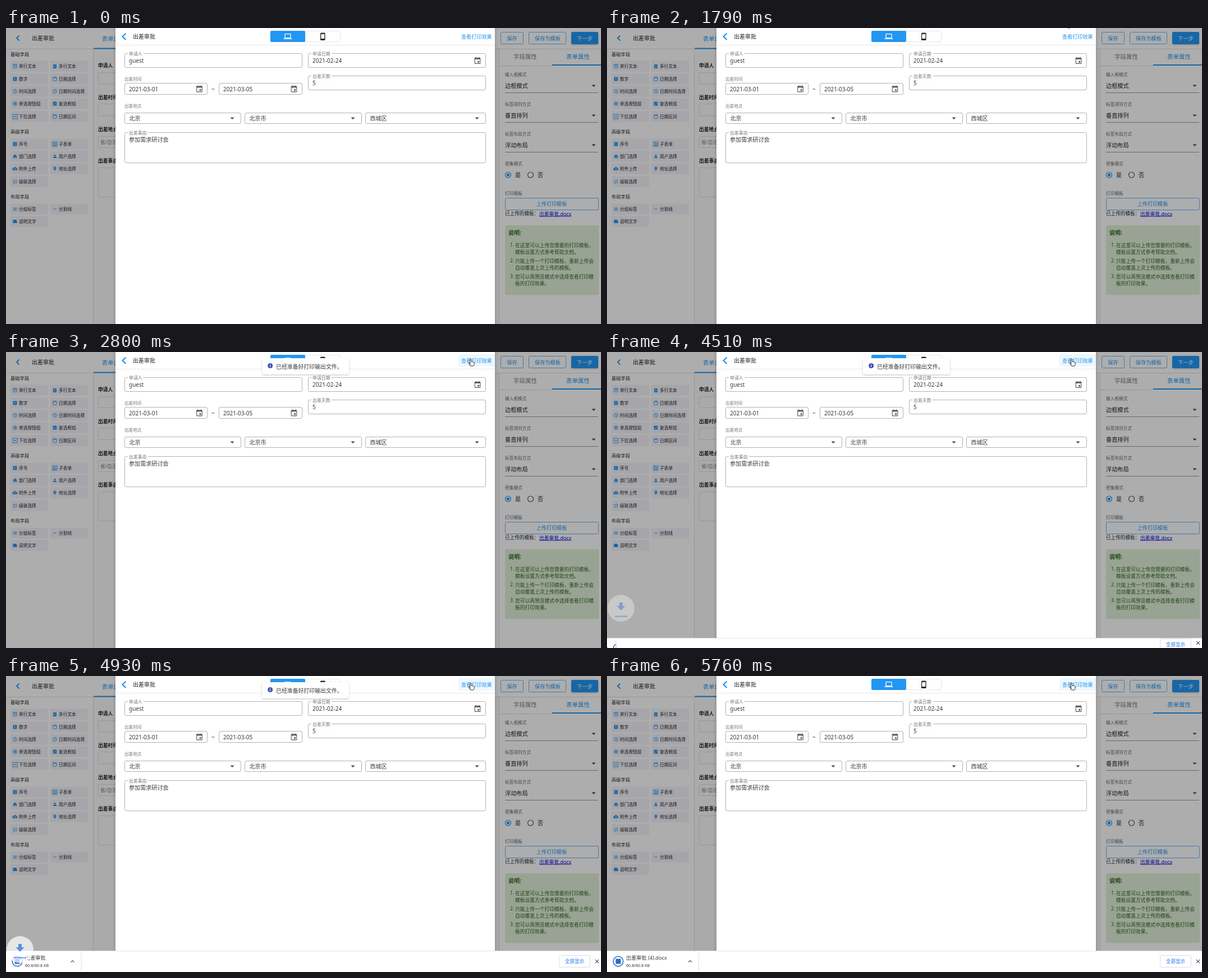
Animation, 1060 px wide and 528 px high, one loop 8 s. Source, as an HTML page:

```html
<!DOCTYPE html>
<html lang="zh-CN">
<head>
<meta charset="utf-8">
<title>表单预览</title>
<style>
html, body { margin: 0; width: 100%; height: 100%; overflow: hidden; background: #fff; }
svg { display: block; width: 1060px; height: 528px; }
text { font-family: "Noto Sans", "Noto Sans CJK SC", "Noto Sans CJK", sans-serif; white-space: pre; }
</style>
</head>
<body>
<svg id="stage" viewBox="0 0 1060 528"></svg>
<script>
const BLUE = '#2196f3', OUTLINE = '#64b5f6', FIELD = '#b2b2b2', GREEN = '#2f6420';
const LOOP = 8000;

// Shape helpers; text is placed by its vertical centre.
const rect = (x, y, w, h, fill, more = '') =>
  `<rect x="${x}" y="${y}" width="${w}" height="${h}" fill="${fill}" ${more}/>`;
const box = (x, y, w, h, stroke, r = 2, fill = 'none') =>
  rect(x + .5, y + .5, w - 1, h - 1, fill, `rx="${r}" stroke="${stroke}"`);
const text = (x, y, size, str, fill = '#3a3a3a', more = '') =>
  `<text x="${x}" y="${y + size * .4}" font-size="${size}" fill="${fill}" ${more}>${str}</text>`;
const line = (d, stroke, w = 1, more = '') =>
  `<path d="${d}" fill="none" stroke="${stroke}" stroke-width="${w}" ${more}/>`;
const shape = (d, fill) => `<path d="${d}" fill="${fill}"/>`;
const dot = (x, y, r, fill, more = '') => `<circle cx="${x}" cy="${y}" r="${r}" fill="${fill}" ${more}/>`;
const at = (x, y, body) => `<g transform="translate(${x} ${y})">${body}</g>`;
const caret = (x, y) => shape(`M${x - 3.5} ${y - 1.5}h7l-3.5 3.5z`, '#444');
const MID = 'text-anchor="middle"';
const BOLD = 'font-weight="700"';

// Small sidebar icons, centred on 0,0.
const frame = rect(-3.2, -3.2, 6.4, 6.4, 'none', `rx=".6" stroke="${BLUE}" stroke-width=".9"`);
const ring = dot(0, 0, 3.4, 'none', `stroke="${BLUE}" stroke-width=".9"`);
const stroke = d => line(d, BLUE, .9);
const icons = {
  edit: frame + stroke('M-3-1.8h6M-1.5 .6h3'),
  clip: rect(-3, -3, 6, 7, BLUE, 'rx=".8"') + line('M-1.5-.6h3M-1.5 1.4h3', '#fff', .7),
  num: rect(-3.4, -3.4, 6.8, 6.8, BLUE, 'rx=".8"') + line('M-1-1.5h1v3.6', '#fff', .9),
  cal: frame + stroke('M-3-2h6M-1.6-4v1.5M1.6-4v1.5'),
  clock: ring + stroke('M0-2V.3L1.5 1.2'),
  radio: ring + dot(0, 0, 1.7, BLUE),
  check: rect(-3.4, -3.4, 6.8, 6.8, BLUE, 'rx=".8"') + line('M-2 0L-.5 1.5 2.2-1.4', '#fff', .9),
  drop: rect(-4, -4, 8, 8, 'none', `stroke="${BLUE}" stroke-width=".9"`) + shape('M-2-.9h4L0 1.4z', BLUE),
  table: rect(-4, -4, 8, 8, 'none', `stroke="${BLUE}" stroke-width=".8"`) + stroke('M-2-4v8M-1-1.5h4M-1 .5h4M-1 2.5h4'),
  home: shape('M0-3.8L4 0H2.8v3.4H.8V1H-.8v2.4H-2.8V0H-4z', BLUE),
  user: dot(0, -1.6, 1.6, BLUE) + shape('M-3 3V2Q-3 .6 0 .6T3 2V3z', BLUE),
  cloud: shape('M-2.5 2.8a2 2 0 0 1-.3-4A3 3 0 0 1 2.8-.9a1.9 1.9 0 0 1 .2 3.7z', BLUE) + line('M0 2V-.8M-1.2 .4L0-.9 1.2 .4', '#fff', .7),
  pin: shape('M0 4L-2.2 .2A2.6 2.6 0 1 1 2.2 .2z', BLUE) + dot(0, -1.3, .9, '#fff'),
  loop: stroke('M-3 0V-2H3M1.6-3.6L3-2 1.6-.6M3 0V2H-3M-1.6 .6L-3 2-1.6 3.6'),
  rows: stroke('M-3.5-2h7M-3.5 0h7M-3.5 2h7'),
  dash: stroke('M-3 0h6'),
  note: shape('M-3.6-3H1.6L3.6-1V3H-3.6z', BLUE)
};

function sidebar() {
  const groups = [
    [47, '基础字段', [68, 91, 113, 135, 158], ['edit 单行文本', 'clip 多行文本', 'num 数字', 'cal 日期选择', 'clock 时间选择',
      'clock 日期时间选择', 'radio 单选按钮组', 'check 复选框组', 'drop 下拉选择', 'cal 日期区间']],
    [185, '高级字段', [207, 229, 251, 274], ['num 序号', 'table 子表单', 'home 部门选择', 'user 用户选择', 'cloud 附件上传',
      'pin 地址选择', 'loop 级联选择']],
    [301, '布局字段', [323, 345], ['rows 分组标签', 'dash 分割线', 'note 说明文字']]
  ];
  return groups.map(([y, title, rows, items]) =>
    text(8, y, 8.3, title, '#222') + items.map((item, i) => {
      const [icon, label] = item.split(' ');
      const x = 8 + i % 2 * 71, cy = rows[i >> 1];
      return rect(x, cy - 9.5, 67, 19, '#f3f3fa') + at(x + 8, cy, icons[icon]) + text(x + 15, cy, 7.7, label, '#222');
    }).join('')).join('');
}

function canvasArea() {
  const rows = [[66, '申请人', 79, 21], [123, '出差时间', 135, 22], [180, '出差地点', 193, 21], [236, '出差事由', 249, 53]];
  return rows.map(([y, label, top, h]) =>
    text(164, y, 8.8, label, '#222', BOLD) + box(164, top, 60, h, '#ddd')).join('') +
    text(168, 203, 8.8, '省/自治区', '#777');
}

function properties() {
  const selects = [[83, '输入框模式', '边框模式'], [136, '标签排列方式', '垂直排列'], [189, '标签布局方式', '浮动布局']];
  const notes = [[387, '1. ', '在这里可以上传您需要的打印模板，'], [399, '', '模板设置方式参考帮助文档。'],
    [415, '2. ', '只能上传一个打印模板，重新上传会'], [427, '', '自动覆盖上次上传的模板。'],
    [443, '3. ', '您可以再预览模式中选择查看打印模'], [455, '', '板的打印效果。']];
  return line('M878.5 37V528M878 67.5H973', '#ddd') + rect(973, 65, 87, 2, BLUE) +
    text(925, 51, 10.5, '字段属性', '#777', MID) + text(1019, 51, 10.5, '表单属性', BLUE, MID) +
    selects.map(([y, label, value]) => text(889, y, 7.7, label, '#666') + text(889, y + 20, 10.2, value, '#222') +
      line(`M889 ${y + 32.5}H1055`, '#999') + caret(1047, y + 20)).join('') +
    text(889, 242, 7.7, '密集模式', '#666') +
    dot(894.5, 262, 5, 'none', `stroke="${BLUE}" stroke-width="1.2"`) + dot(894.5, 262, 2.6, BLUE) + text(907, 262, 10, '是', '#222') +
    dot(934.5, 262, 5, 'none', 'stroke="#555" stroke-width="1.2"') + text(947, 262, 10, '否', '#222') +
    text(889, 295, 7.7, '打印模板', '#666') + box(889, 303, 167, 22, OUTLINE) + text(972, 313.5, 9.1, '上传打印模板', BLUE, MID) +
    text(889, 331, 8.6, '已上传的模板：', '#222') + text(950, 331, 8.8, '出差审批.docx', '#0000e0', 'text-decoration="underline"') +
    rect(889, 352, 167, 124, '#dff0d8', 'rx="2"') + text(895, 365, 10, '说明:', GREEN, BOLD) +
    notes.map(([y, n, str]) => text(898, y, 8.6, n, GREEN) + text(907, y, 8.75, str, GREEN)).join('');
}

function page() {
  return rect(0, 0, 1060, 528, '#fff') + rect(156, 38, 722, 490, '#fafafa') +
    line('M0 37.5H1060M155.5 37V528', '#ddd') +
    line('M23.5 13.5L19 18l4.5 4.5', BLUE, 1.8) + text(46, 18, 10, '出差审批', '#222') +
    text(171, 19, 10.2, '表单设计', BLUE) + rect(156, 35.5, 60, 2, BLUE) +
    box(881, 7, 41, 22, OUTLINE) + text(901.5, 18, 9.3, '保存', BLUE, MID) +
    box(931, 7, 67, 22, OUTLINE) + text(965, 18, 9.2, '保存为模板', BLUE, MID) +
    rect(1007, 7, 48, 22, BLUE, 'rx="2" filter="url(#soft)"') + text(1031, 18, 9.3, '下一步', '#fff', MID) +
    sidebar() + canvasArea() + properties() + rect(0, 0, 1060, 528, '#000', 'opacity=".32"');
}

const calendar = (x, y) => at(x, y,
  rect(-4.8, -4.4, 9.6, 9.8, 'none', 'rx="1" stroke="#555" stroke-width="1.1"') +
  rect(-5, -4.6, 10, 2.4, '#555') + line('M-3-6v2M3-6v2', '#555', 1.1) + rect(.2, .8, 2.8, 2.8, '#555'));

function outlined(x, y, w, h, label, len) {
  return box(x, y, w, h, FIELD, 2.5) + rect(x + 6, y - 1, len * 8 + 4, 3, '#fff') + text(x + 8, y + .5, 7.9, label, '#777');
}

function dialog() {
  const places = [[211, 208, '北京'], [425, 209, '北京市'], [640, 215, '西城区']];
  return rect(195, -10, 676, 560, '#fff', 'filter="url(#deep)"') + line('M195 30.5H871', '#e8e8e8') +
    line('M213.5 9.5L207.5 15.2l6 5.8', BLUE, 2.2) + text(226, 15, 10, '出差审批', '#222') +
    box(471, 5, 125, 20, '#e6e6e6') + rect(471, 5, 62, 20, BLUE, 'rx="2"') +
    rect(497, 10.6, 10, 7, 'none', 'rx=".8" stroke="#fff" stroke-width="1.3"') + rect(494.5, 18.3, 15, 1.5, '#fff') +
    rect(560, 8.5, 8.6, 13.4, '#222', 'rx="1.5"') + rect(561.3, 10.8, 6, 8.2, '#fff') +
    outlined(211, 45, 317, 26, '申请人', 3) + text(219, 58, 10, 'guest') +
    outlined(538, 45, 317, 26, '申请日期', 4) + text(546, 58, 10, '2021-02-24') + calendar(840, 58) +
    text(211, 91, 7.6, '出差时间', '#777') + box(211, 98, 148, 21, FIELD, 2.5) + text(219, 108.5, 10, '2021-03-01') + calendar(344.5, 108.5) +
    text(366, 109, 10, '~') + box(379, 98, 149, 21, FIELD, 2.5) + text(387, 108.5, 10, '2021-03-05') + calendar(513, 108.5) +
    outlined(538, 85, 317, 26, '出差天数', 4) + text(546, 98, 10, '5') +
    text(211, 139, 7.6, '出差地点', '#777') +
    places.map(([x, w, name]) => box(x, 151, w, 20, FIELD, 2.5) + text(x + 8.5, 161, 10, name) + caret(x + w - 16, 161)).join('') +
    outlined(211, 186, 644, 55, '出差事由', 4) + text(219, 198.5, 10.1, '参加需求研讨会');
}

const link = `<g clip-path="url(#linkClip)">${rect(806, 4, 65, 22, BLUE, 'id="hover"')}${dot(829, 16, 1, BLUE, 'id="ripple"')}</g>` +
  text(811, 15.2, 9.1, '查看打印效果', BLUE);

const toast = `<g id="toast">${rect(456, 11, 155, 29, '#fff', 'rx="2.5" filter="url(#soft)"')}` +
  dot(470.7, 24.5, 4.5, '#3f51b5') + rect(470.1, 23.8, 1.2, 3, '#fff') + rect(470.1, 22, 1.2, 1.1, '#fff') +
  text(481, 25.8, 9.9, '已经准备好打印输出文件。') + '</g>';

// Shelf parts are placed relative to its top edge.
const shelf = `<g id="shelf">${rect(0, 0, 1060, 40, '#fff')}${line('M0 .5H1060', '#e4e4e4')}
  <g clip-path="url(#itemClip)">${dot(20, 19, 8.8, '#fff', 'stroke="#2a65c0" stroke-width="1.5"')}${rect(15.5, 14.5, 9, 9, '#2b6cc4')}
  <g clip-path="url(#nameClip)">${text(34, 12.5, 9.2, '出差审批 (4).docx')}</g>${text(34, 26, 7.2, '60.8/60.8 KB', '#333')}</g>
  <g id="edge">${line('M-19 20.5l3-3 3 3', '#555', 1.2)}${line('M-.5 4V35', '#ddd')}</g></g>
  <g id="showAll">${box(985, -11, 56, 22, '#dadce0', 2)}${text(1013, 0, 8.6, '全部显示', '#1a73e8', MID)}</g>
  <g id="close">${line('M1050-3l6 6M1056-3l-6 6', '#555', 1.1)}</g>
  <g id="badge">${dot(0, 0, 24, '#fff', 'opacity=".9"')}${shape('M-3-10H3V-4H7.5L0 4-7.5-4H-3z', '#4285f4')}${rect(-11, 13.5, 22, 2, '#4285f4')}</g>`;

const cursor = `<g id="arrow"><path d="M0 0V12L2.8 9.4 4.7 13.8 6.5 13 4.6 8.8H8.4z" fill="#fff" stroke="#222" stroke-width=".8"/></g>
  <g id="hand"><path d="M-3 5V-5Q-3-6.4-2-6.4T-.9-5V-1Q.2-1.7 1-.8 2.2-1.3 2.8-.3 4.4-.6 4.4 1V3.5Q4.4 5 3.2 6.6H-2.2Q-4 4-5.4 1.6-5.6 .2-4.4 .5L-3 2" fill="#fff" stroke="#222" stroke-width=".9"/></g>`;

const stage = document.getElementById('stage');
stage.innerHTML = `<defs>
  <filter id="soft" x="-10%" y="-30%" width="120%" height="170%"><feDropShadow dx="0" dy="1" stdDeviation="1.6" flood-opacity=".24"/></filter>
  <filter id="deep" x="-5%" y="-5%" width="110%" height="110%"><feDropShadow dx="0" dy="1" stdDeviation="3" flood-opacity=".25"/></filter>
  <clipPath id="linkClip"><rect x="806" y="4" width="65" height="22"/></clipPath>
  <clipPath id="itemClip"><rect id="itemArea" width="0" height="40"/></clipPath>
  <clipPath id="nameClip"><rect id="nameArea" width="0" height="40"/></clipPath>
</defs>` + page() + dialog() + link + toast + shelf + cursor;

const el = id => document.getElementById(id);
const set = (id, attrs) => { for (const k in attrs) el(id).setAttribute(k, attrs[k]); };
const move = (id, x, y, opacity = 1) => set(id, { transform: `translate(${x} ${y})`, opacity });
const span = (t, from, to) => Math.max(0, Math.min(1, (t - from) / (to - from)));
const mix = (a, b, p) => a + (b - a) * p;
const easeOut = p => 1 - (1 - p) ** 2;

function drawCursor(t) {
  let x = 0, y = 0, arrow = 0;
  if (t >= 220 && t < 290) [x, y, arrow] = [1048, 518, 1];
  else if (t >= 1300 && t < 1630) {
    const p = span(t, 1300, 1600);
    [x, y, arrow] = [mix(1045, 798, p), mix(510, -6, p), 1];
  }
  const p = easeOut(span(t, 1790, 2090));
  const hx = mix(823, 829.7, p), hy = mix(-7, 18.3, p);
  const over = hy > 8;
  if (t >= 1790 && !over) [x, y, arrow] = [hx - 5, hy - 6, 1];
  move('arrow', x, y, arrow);
  move('hand', hx, hy, t >= 1790 && over ? 1 : 0);
  set('hover', { opacity: .08 * span(t, 1880, 2030) });
}

function drawToast(t) {
  const enter = span(t, 2390, 2690), leave = span(t, 5430, 5750);
  const y = -40 * (1 - enter) ** 3 - 40 * leave ** 2;
  move('toast', 0, y, Math.min(1, enter * 2.7) * (1 - leave));
}

function drawShelf(t) {
  const shown = t >= 4500 ? 1 : 0;
  const h = Math.round(38 * easeOut(span(t, 4478, 4598)));
  const top = 528 - h, mid = top + h / 2;
  const edge = 164 * easeOut(span(t, 4470, 5270));
  move('shelf', 0, top, shown);
  move('showAll', 0, Math.max(mid, top + 12), shown);
  move('close', 0, mid, shown);
  move('edge', edge, 0);
  set('itemArea', { width: edge });
  set('nameArea', { width: Math.max(0, 69 + (edge - 133) * 1.3) });
  const fade = span(t, 4440, 4640) * (1 - span(t, 4870, 5130));
  move('badge', 25, 457 + (t - 4510) * 31 / 420, shown * fade);
}

function draw(t) {
  drawCursor(t);
  set('ripple', { r: 2 + Math.max(0, t - 2240) * .1, opacity: t < 2240 ? 0 : .18 * (1 - span(t, 2560, 2790)) });
  drawToast(t);
  drawShelf(t);
}

const start = performance.now();
function tick() {
  draw((performance.now() - start) % LOOP);
  requestAnimationFrame(tick);
}
tick();
</script>
</body>
</html>
```
